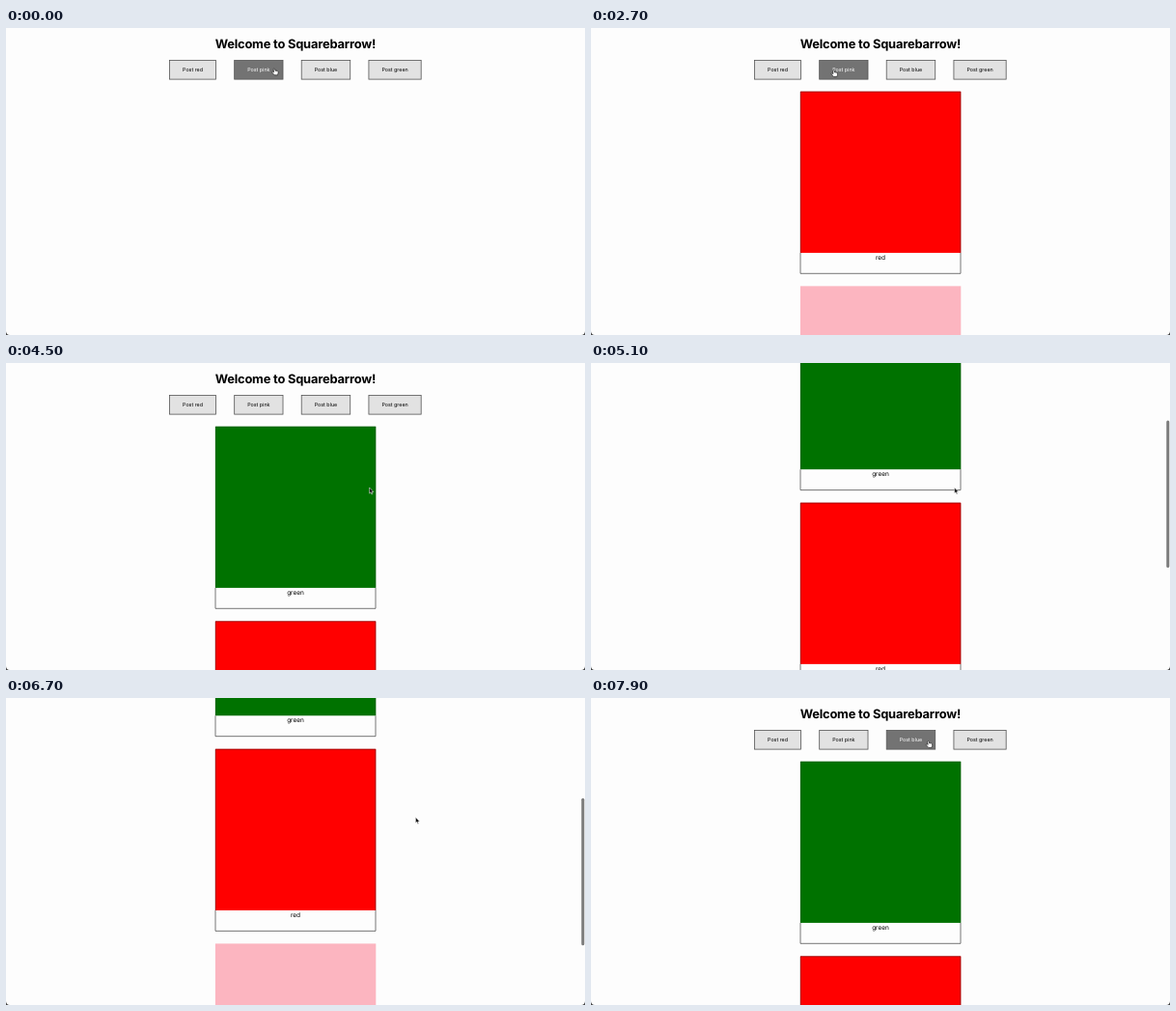
An HTML page for the animation above (8 s loop, 600x318 px).

```html
<!DOCTYPE html>
<html lang="en">
<head>
<meta charset="utf-8">
<title>Squarebarrow</title>
<style>
  html, body { margin: 0; width: 100%; height: 100%; overflow: hidden; background: #fdfdfd; }
  svg { display: block; width: 100vw; height: 100vh; }
  text { font-family: Inter, Roboto, "Liberation Sans", sans-serif; text-anchor: middle; text-rendering: geometricPrecision; }
</style>
</head>
<body>
<svg viewBox="0 0 600 318" xmlns="http://www.w3.org/2000/svg">
  <rect width="600" height="318" fill="#fdfdfd"/>
  <g id="page">
    <text x="299.9" y="21.4" font-size="12.9" font-weight="700" letter-spacing="-0.2">Welcome to Squarebarrow!</text>
  </g>
  <rect id="thumb" x="596.3" width="3" rx="1.5" fill="#7b7b7b"/>
  <circle id="ring" r="13" fill="none" stroke="#333"/>
  <path id="arrow" d="M0 0V6.1L1.4 4.8L2.3 7L3.3 6.6L2.4 4.5H4.3Z" fill="#111" stroke="#fff" stroke-width=".5"/>
  <path id="hand" d="M-.8 .4Q0 -.6 .8 .4L1.1 2.1Q3.8 1.8 4.1 3.1Q4.5 4.8 3.5 6.7H.3L-2.2 4Q-2.3 2.8 -1.2 3.1L-.3 3.7Z" fill="#fff" stroke="#222" stroke-width=".7" stroke-linejoin="round"/>
  <path d="M0 314.2Q.3 317.7 3.8 318H0ZM600 314.2Q599.7 317.7 596.2 318H600Z" fill="#3c3c3c"/>
</svg>
<script>
const LOOP = 8000, STEP = 100, VIEW = 318, PAGE = 661.5;
const LEFT = 169.5, GAP = 19.2, SIZE = 166.6, PITCH = 201.67;
const $ = id => document.getElementById(id);

function add(parent, tag, attrs, text) {
  const el = document.createElementNS("http://www.w3.org/2000/svg", tag);
  for (const k in attrs) el.setAttribute(k, attrs[k]);
  if (text) el.textContent = text;
  parent.appendChild(el);
  return el;
}

// Buttons sit in a row, each as wide as its label plus padding
let edge = LEFT;
const buttons = ["red", "pink", "blue", "green"].map(name => {
  const label = add($("page"), "text", { y: 45.1, "font-size": 5.35 }, "Post " + name);
  const w = label.getComputedTextLength() + 27;
  const x = edge;
  edge += w + GAP;
  label.setAttribute("x", x + w / 2);
  const box = add($("page"), "rect", { x, y: 33.5, width: w, height: 19.6, stroke: "#555", "stroke-width": .8 });
  $("page").insertBefore(box, label);
  return { x, w, box, label };
});

const posts = [
  { name: "pink", fill: "#fcb5c0", born: 900, shade: 0 },
  { name: "red", fill: "#ff0000", born: 2300, shade: .6 },
  { name: "green", fill: "#007200", born: 4200, shade: .25 }
].map(({ name, fill, born, shade }) => {
  const g = add($("page"), "g", {});
  add(g, "rect", { x: 216.9, y: 65.7, width: SIZE - .2, height: SIZE + .6, fill });
  add(g, "path", { d: "M217.2 233V66.1H382.9V233", stroke: "#000", "stroke-width": .6, fill: "none", opacity: shade });
  add(g, "path", { d: "M217 233V254.3H383V233" + (shade ? "" : "Z"), stroke: "#555", "stroke-width": .8, fill: "none" });
  add(g, "text", { x: 300, y: 239.7, "font-size": 6.5 }, name);
  return { g, born };
});

const easeOut = u => 1 - (1 - u) ** 3;
const glide = u => 1 - (1 - u ** 1.5) ** 1.9;

const cursorMoves = [
  { from: 100, to: 200, x: 276, y: 43.8 },
  { from: 300, to: 500, x: 264.5, y: 46 },
  { from: 1200, to: 2100, x: 195.5, y: 44.5 },
  { from: 2600, to: 3600, x: 401.3, y: 42 },
  { from: 4300, to: 4500, x: 376.6, y: 129 },
  { from: 6500, to: 7000, x: 437.6, y: 122 },
  { from: 7400, to: 7900, x: 349.5, y: 44.7 }
];
const scrollMoves = [
  { from: 4600, to: 6000, y: 335 },
  { from: 6100, to: 6400, y: PAGE - VIEW },
  { from: 6500, to: 7050, y: 0 }
];
const clicks = [[700, 900], [2100, 2300], [4000, 4200]];

// Follows each move in turn from wherever the last one ended
function follow(start, moves, key, t, ease) {
  let value = start;
  for (const m of moves) {
    const u = Math.max(0, Math.min(1, (t - m.from) / (m.to - m.from)));
    value += (m[key] - value) * ease(u);
  }
  return value;
}

function show(el, on) { el.style.display = on ? "" : "none"; }
function move(el, x, y) { el.setAttribute("transform", `translate(${x} ${y})`); }

function draw(time) {
  const t = Math.floor(time % LOOP / STEP) * STEP;
  const x = follow(277.9, cursorMoves, "x", t, easeOut);
  const y = follow(42.1, cursorMoves, "y", t, easeOut);
  const scroll = follow(0, scrollMoves, "y", t, glide);
  move($("page"), 0, -scroll);

  let over = false;
  for (const b of buttons) {
    const hot = x >= b.x && x <= b.x + b.w && y + scroll >= 33 && y + scroll <= 53.5;
    over = over || hot;
    b.box.setAttribute("fill", hot ? "#737373" : "#e2e2e2");
    b.label.setAttribute("fill", hot ? "#fff" : "#000");
  }

  const count = posts.filter(p => t >= p.born).length;
  posts.forEach((p, i) => {
    show(p.g, i < count);
    move(p.g, 0, (count - 1 - i) * PITCH);
  });

  show($("arrow"), !over);
  show($("hand"), over);
  move(over ? $("hand") : $("arrow"), x, y);
  show($("ring"), clicks.some(([from, to]) => t >= from && t < to));
  move($("ring"), x, y);

  const thumb = $("thumb");
  thumb.setAttribute("y", .6 + scroll * VIEW / PAGE);
  thumb.setAttribute("height", VIEW * VIEW / PAGE - .5);
  thumb.setAttribute("opacity", t < 4700 ? 0 : Math.max(0, Math.min(1, (7800 - t) / 400)));
}

function tick(now) {
  draw(now);
  requestAnimationFrame(tick);
}
draw(0);
requestAnimationFrame(tick);
</script>
</body>
</html>
```
